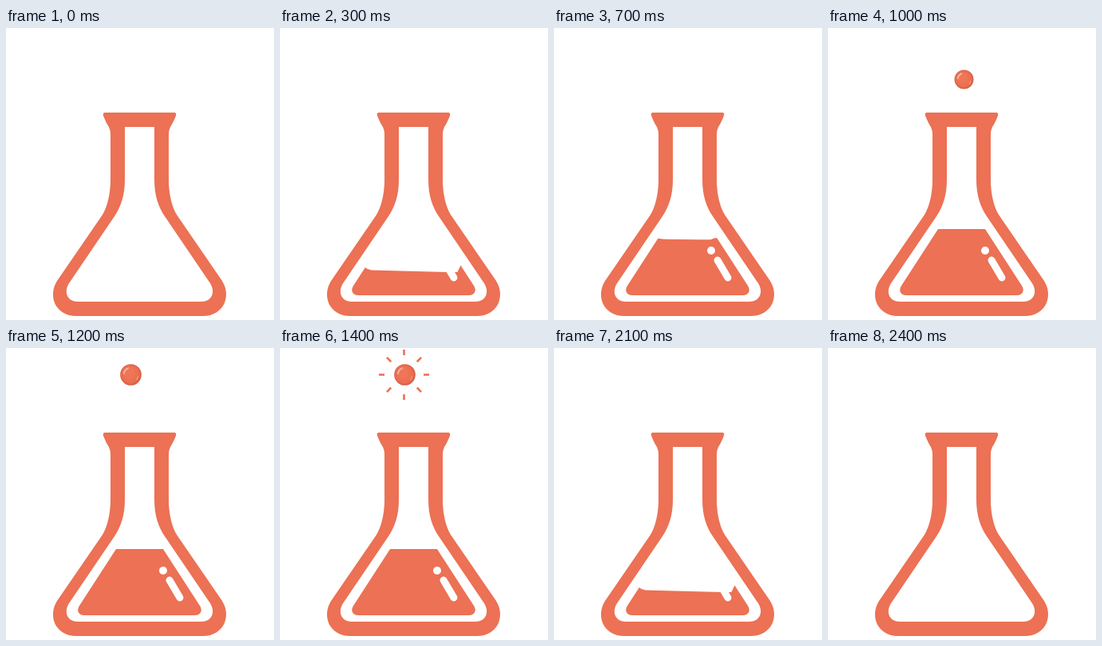
These frames come from a looping animation (336x366 px, 2.5 s). An HTML page with a canvas:

```html
<!DOCTYPE html>
<html lang="en">
<head>
<meta charset="utf-8">
<title>Flask</title>
<style>
html, body { margin: 0; width: 100%; height: 100%; overflow: hidden; background: #fff; }
canvas { display: block; width: 336px; height: 366px; }
</style>
</head>
<body>
<canvas id="stage" width="336" height="366"></canvas>
<script>
const ctx = document.getElementById('stage').getContext('2d');
const CORAL = '#ec7155';
const LOOP = 2500, STEP = 100, MID = 167.5;

// Outer wall with the rim, then the hollow inside.
const flask = new Path2D(`M124 106 H211 Q214 106 213 110 Q209 120 206 124
  Q204 128 204 134 V190 C204 208 208 224 214 234 L271 317
  C283 336 273 361 247 361 H88 C62 361 52 336 64 317 L121 234
  C127 224 131 208 131 190 V134 Q131 128 129 124 Q126 120 122 110
  Q121 106 124 106 Z
  M149 124 V190 C149 210 144 224 136 236 L79 320 C72 331 77 343 90 343
  H245 C258 343 263 331 256 320 L199 236 C191 224 186 210 186 190 V124 Z`);
const vessel = new Path2D(`M138 252 L92 323 C88 329 91 335 98 335
  H237 C244 335 247 329 243 323 L197 252 Z`);

function disc(x, y, r, color) {
  ctx.fillStyle = color;
  ctx.beginPath();
  ctx.arc(x, y, r, 0, Math.PI * 2);
  ctx.fill();
}

function line(x1, y1, x2, y2, width, color) {
  ctx.strokeStyle = color;
  ctx.lineWidth = width;
  ctx.beginPath();
  ctx.moveTo(x1, y1);
  ctx.lineTo(x2, y2);
  ctx.stroke();
}

function drawFlask() {
  ctx.fillStyle = CORAL;
  ctx.fill(flask, 'evenodd');
}

// Fill runs from 0 (empty) to 10 (full); the surface clings to the glass while low.
function drawLiquid(fill) {
  if (fill <= 0) return;
  const u = Math.min(fill / 10, 1);
  const y = 335 - 83 * u * (1 + 0.975 * u * (1 - u));
  const cling = fill <= 6 ? 1 : fill <= 7 ? 0.2 : 0;
  const half = 29.5 + (y - 252) * 0.648;
  const left = MID - half, right = MID + half;

  ctx.save();
  ctx.clip(vessel);
  ctx.fillStyle = CORAL;
  ctx.beginPath();
  ctx.moveTo(left - 8, y - 6 * cling);
  ctx.lineTo(left + 3, y - 5 * cling);
  ctx.quadraticCurveTo(left + 6, y - 2 * cling, left + 11, y - 1.5 * cling);
  ctx.lineTo(right - 22, y + cling);
  ctx.lineTo(right - 9, y + cling);
  ctx.lineTo(right - 4, y - 9 * cling);
  ctx.lineTo(right + 8, y - 9 * cling);
  ctx.lineTo(275, 340);
  ctx.lineTo(60, 340);
  ctx.fill();
  disc(197, 279, 5, '#fff');
  ctx.lineCap = 'round';
  line(205, 291, 218, 313, 9, '#fff');
  ctx.restore();
}

function drawBubble(x, y, r) {
  const g = ctx.createRadialGradient(x - r * 0.2, y - r * 0.2, r * 0.4, x, y, r);
  g.addColorStop(0, '#f07657');
  g.addColorStop(0.75, '#e96c4e');
  g.addColorStop(1, '#cf5a40');
  disc(x, y, r, g);
  ctx.strokeStyle = '#f8b3a0';
  ctx.lineWidth = 2;
  ctx.beginPath();
  ctx.arc(x, y, r * 0.66, Math.PI * 1.03, Math.PI * 1.4);
  ctx.stroke();
  ctx.strokeStyle = '#f29a83';
  ctx.lineWidth = 1.2;
  ctx.beginPath();
  ctx.arc(x, y, r * 0.7, 0.15, 0.75);
  ctx.stroke();
}

function drawRays(inner, outer, width) {
  ctx.lineCap = 'butt';
  for (let i = 0; i < 8; i++) {
    const a = i * Math.PI / 4, c = Math.cos(a), s = Math.sin(a);
    const near = inner - (i % 2) * 1.5, far = outer - (i % 2);
    line(155.5 + c * near, 33.5 + s * near, 155.5 + c * far, 33.5 + s * far, width, CORAL);
  }
}

function draw(tick) {
  ctx.fillStyle = '#fff';
  ctx.fillRect(0, 0, 336, 366);
  drawFlask();
  drawLiquid(Math.min(tick, 24 - tick));

  if (tick > 7 && tick < 15) {
    const u = Math.min((tick - 7) / 5, 1);
    const x = 168 - 11.5 * u * u + 7 * Math.sin(Math.PI * u);
    drawBubble(x, 33.5 + 231 * Math.pow(1 - u, 2.19), 10 + 3.3 * u);
  }
  if (tick === 13) drawRays(20, 25, 2.6);
  if (tick === 14) drawRays(24.5, 31.5, 2.6);
  if (tick === 15) drawRays(28.5, 32, 1.6);
}

const start = performance.now();
function frame(now) {
  draw(Math.floor(Math.max(0, now - start) % LOOP / STEP));
  requestAnimationFrame(frame);
}
draw(0);
requestAnimationFrame(frame);
</script>
</body>
</html>
```
